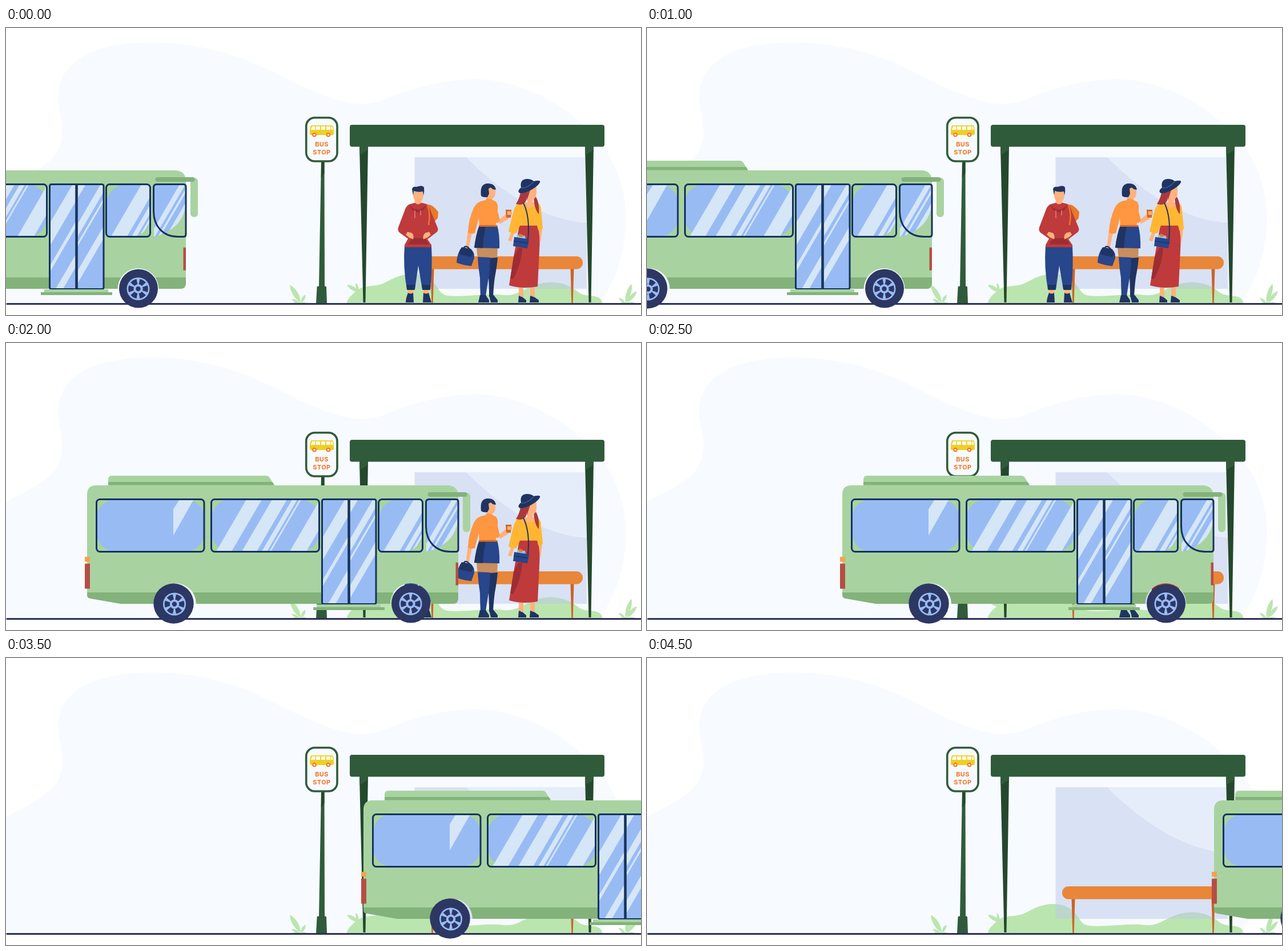
Animation of 1112x504 px, one loop 5 s. Source, as an HTML page:

```html
<!DOCTYPE html>
<html lang="en">
<head>
<meta charset="utf-8">
<title>Bus stop</title>
<style>
  html, body { margin: 0; width: 100%; height: 100%; overflow: hidden; background: #fff; }
  svg { display: block; width: 100%; height: 100%; }
  .word { font: 700 11px Inter, "Open Sans", sans-serif; letter-spacing: .4px; fill: #ee7524; text-anchor: middle; }
  .bus { animation: drive 5s step-end infinite; }
  .man { animation: board1 5s step-end infinite; }
  .women { animation: board2 5s step-end infinite; }
  .frame { fill: none; stroke: #16335f; stroke-width: 3; }
  .glass { fill: #98bbf4; }
  .shine { fill: #d5e6f6; }
  .green { fill: #a8d3a0; }
  .shade { fill: #83b27b; }
  .pine { fill: #305b3a; }
  .moss { fill: #24482d; }
  .leaf { fill: #bbe5ae; }
  .skin { fill: #ffb27d; }
  .navy { fill: #1f3462; }
  .blue { fill: #27468b; }
  .red { fill: #bf3a3b; }
  .wine { fill: #9c2d35; }
  @keyframes drive {
    0% { transform: translateX(-477px); }
    10% { transform: translateX(-404px); }
    20% { transform: translateX(-293px); }
    30% { transform: translateX(-176px); }
    40% { transform: translateX(0); }
    50% { transform: translateX(200px); }
    60% { transform: translateX(306px); }
    70% { transform: translateX(484px); }
    80% { transform: translateX(773px); }
    90%, 100% { transform: translateX(851px); }
  }
  @keyframes board1 { 0% { visibility: visible; } 50%, 100% { visibility: hidden; } }
  @keyframes board2 { 0% { visibility: visible; } 60%, 100% { visibility: hidden; } }
</style>
</head>
<body>
<svg viewBox="0 0 1112 504" preserveAspectRatio="none">
  <defs>
    <path id="leaf" class="leaf" d="M0 0C-7-8-8-25-1-34C6-26 7-10 0 0z"/>
    <path id="spoke" fill="#2c3763" d="M-6-16.2A17 17 0 0 1 6-16.2L3-7.6A8 8 0 0 0-3-7.6z"/>
    <g id="rim">
      <circle r="20" fill="#98bbf4"/>
      <use href="#spoke" transform="rotate(30)"/>
      <use href="#spoke" transform="rotate(90)"/>
      <use href="#spoke" transform="rotate(150)"/>
      <use href="#spoke" transform="rotate(210)"/>
      <use href="#spoke" transform="rotate(270)"/>
      <use href="#spoke" transform="rotate(330)"/>
      <circle r="4.2" fill="#2c3763"/>
    </g>
    <path id="shell" d="M142 266Q142 250 158 250H772Q792 250 792 270V448Q792 458 782 458H744.5A36 36 0 0 0 672.5 458H333A36 36 0 0 0 261 458H201L147 448.500Q142 447.500 142 442z"/>
    <clipPath id="cShell"><use href="#shell"/></clipPath>
    <clipPath id="cDoor"><path d="M554 275h45v183h-45zM603 275h44v183h-44z"/></clipPath>
    <clipPath id="cSide"><path d="M654 307A32 32 0 0 1 686 275H729V334A32 32 0 0 1 697 366H654z"/></clipPath>
    <clipPath id="cNose"><path d="M736 275H792V306C790 338 770 358 736 367z"/></clipPath>
  </defs>

  <path fill="#f7faff" d="M0 279C28 264 58 250 79 231C103 208 101 177 95 149C84 106 97 68 142 46C180 28 238 22 294 27C427 39 487 95 563 121C602 135 633 138 665 125C720 102 775 89 827 90C905 92 990 137 1043 205C1079 252 1088 307 1085 350C1081 407 1065 447 1040 484H0z"/>

  <!-- greenery -->
  <path class="leaf" d="M597 484C597 475 609 465 617 459C628 451 644 455 660 449C678 440 690 432 712 432C736 432 748 444 757 458C762 467 768 470 780 470.500C815 472 843 465 872 469C900 472 912 450 946 447C974 444 991 455 1004 465C1015 474 1044 465 1044 484z"/>
  <use href="#leaf" transform="translate(619 464) rotate(-58) scale(.65 .75)"/>
  <use href="#leaf" transform="translate(617 464) rotate(-12) scale(.4 .5)"/>
  <use href="#leaf" transform="translate(516 482) rotate(-30) scale(.85 1.06)"/>
  <use href="#leaf" transform="translate(517 482) rotate(30) scale(.5 .45)"/>
  <use href="#leaf" transform="translate(514 483) rotate(-62) scale(.4 .45)"/>
  <path class="leaf" d="M499 484Q508 480 516 482Q524 480 528 484z"/>
  <use href="#leaf" transform="translate(1085 482) rotate(19) scale(.75 1)"/>
  <use href="#leaf" transform="translate(1087 482) rotate(43) scale(.65 .78)"/>
  <use href="#leaf" transform="translate(1084 483) rotate(-48) scale(.4 .42)"/>
  <path class="leaf" d="M1073 484Q1080 480 1088 482Q1098 480 1103 484z"/>

  <!-- shelter -->
  <path fill="#bbcae9" opacity=".5" d="M715.500 227H806C848 269 928 337 1017 342V458H715.500z"/>
  <path fill="#d5e2f5" opacity=".5" d="M806 227H1017V342C928 337 848 269 806 227z"/>
  <path fill="#cb6326" d="M743.500 422h6l-1.800 61h-2.400zM988.500 422h6l-1.800 61h-2.400z"/>
  <rect x="727" y="401" width="283" height="22.500" rx="11" fill="#e88639"/>
  <path class="moss" d="M619 208h15l-4.500 274h-4zM1014 208h15l-4.500 274h-4z"/>
  <path class="pine" d="M619 208h15v6l-14.500 9zM1014 208h15v6l-14.500 9z"/>
  <rect class="pine" x="602" y="170" width="446" height="38.500" rx="4"/>

  <!-- sign -->
  <path class="pine" d="M552 234h5.500l.5 221h-10z"/>
  <path class="moss" d="M552 234h5.500v21l-5.700 8z"/>
  <path class="pine" d="M546 453.500h13.500q1.500 0 1.500 2l1 28.500h-19l1.500-28.500q0-2 1.500-2z"/>
  <rect x="525.700" y="157.500" width="54.300" height="76.500" rx="15" fill="#f7faff" stroke="#305b3a" stroke-width="3.600"/>
  <path fill="#efcf23" d="M535 171H571Q573 171 573.300 174L574 181V186Q574 188 572 188H534Q532 188 532 186V180L533 174Q533.500 171 535 171z"/>
  <path fill="#fff" d="M536 172.700h5.500v6h-7.500zM543 172.700h7v6h-7zM552 172.700h7v6h-7zM561 172.700h7v6h-7zM569.500 172.700h2l.8 6h-2.800z"/>
  <g fill="#fff" stroke="#ee7524" stroke-width="2">
    <circle cx="540" cy="187.500" r="2.800"/><circle cx="564.500" cy="187.500" r="2.800"/>
  </g>
  <text class="word" x="553" y="208">BUS</text>
  <text class="word" x="553" y="221.500">STOP</text>

  <path d="M2 484.500H1112" stroke="#2b3155" stroke-width="3.200" stroke-linecap="round"/>

  <g class="man">
    <path fill="#e8782a" d="M738 310Q747 309 757 323L756 334L742 349z"/>
    <path class="skin" d="M704 458h9v12h-9zM731 458h9v12h-9z"/>
    <path class="navy" d="M704 465q4 3 9 0l1 17h-14q0-7 4-17zM731 465q5 3 9 0l5 17h-15z"/>
    <path class="blue" d="M698 382H745Q747 420 743 459H729L722 417L716 459H702Q695 420 698 382z"/>
    <path class="navy" d="M701.500 451h15l-.8 9h-13.500zM728 451h15.500l-.6 9h-13.500z"/>
    <path class="red" d="M708 309Q722 304 736 309Q741 311 744 322L756 351Q758 357 751 361L738 371L745 381V385H698V381L704 370L690 360Q685 356 687 350L698 321Q701 311 708 309z"/>
    <path class="wine" d="M711 369H734L741 380H704zM706 310Q721 328 737 310Q732 322 721 324Q710 322 706 310z"/>
    <path class="skin" d="M703 358l8 2q4 5 2 11l-7-3-6-5zM741 358l-7 2q-5 5-3 11l7-3 6-5zM716 296h11v11q-5 5-11 0z"/>
    <path d="M738 311Q744 326 740 346" fill="none" stroke="#e8782a" stroke-width="2.500"/>
    <path d="M716 320v14M726 320v9" stroke="#e9a9a0" stroke-width="1"/>
    <path class="skin" d="M713 284H731V293Q731 305 722 306Q713 305 713 293z"/>
    <path class="navy" d="M713 294L711 283Q712 278 719 279Q729 275 732 280Q733 287 731 294L730 287Q721 289 714 286z"/>
  </g>

  <g class="women">
    <!-- short hair -->
    <path class="skin" d="M809 355l7 5-5 24-4 3-1-8zM862 338l13-11 1-6 8-2 2 7-6 9-15 9z"/>
    <path fill="#c98d5e" d="M824 386h37l-1 20h-34z"/>
    <path class="navy" d="M846 404l15-1q-1 14-5 35-2 14-3 34h-7q0-19-1-34z"/>
    <path class="blue" d="M826 402l22 1q0 20-3 36-3 17-5 33h-9q-1-18-1-33-3-18-4-37z"/>
    <path class="navy" d="M830 469h10l6 9v4h-19zM846 469h8l7 9v4h-12z"/>
    <path class="blue" d="M829 346h31q5 18 4 41l-44-1q3-24 9-40z"/>
    <path class="navy" d="M829 347h11q-4 20-5 39.500l-15-.5q3-24 9-39z"/>
    <path fill="#ff9640" d="M837 303q12-4 21 2 4 4 3 14l-1 17-3 12H829l-1-14-7 26q-6 3-12-1 1-23 10-43 6-12 18-13z"/>
    <path fill="#ff9640" d="M858 306l3 16 4 16-4 5-6-6z"/>
    <path fill="#d96d27" d="M828 346h32v3h-32z"/>
    <path class="skin" d="M842 278h14l1 11q0 9-6 11l-1 4-8 1z"/>
    <path fill="#ff9640" d="M841 299l11 2-1 7h-12z"/>
    <path class="navy" d="M832 295q-3-22 12-22 12 0 14 11-6 0-9-4l-4 2 1 9-3 6q-7 1-11-2z"/>
    <path fill="#d36a24" d="M875 319h10l-1 14h-8z"/>
    <path fill="#ffb27d" d="M878 322h6v6h-6z"/>
    <path d="M800 391Q803 378 812 388" fill="none" stroke="#1f3462" stroke-width="2.500"/>
    <path class="blue" d="M798 385l16 3q7 6 6 16l-5 14q-14-1-26-6 1-17 9-27z"/>
    <path class="navy" d="M798 385l16 3 5 9-5 5-18-4-3-3z"/>

    <!-- hat -->
    <path class="skin" d="M885 357l5 3-5 15-6-2zM934 352l5 2-3 23-4-9zM898 452h8v22h-8zM918 452h8v22h-8z"/>
    <path class="navy" d="M898 470l7 3 6 5v4h-14zM918 470l8 3 7 5v4h-16z"/>
    <path class="red" d="M899 346h32q5 20 3 45l-3 63q-27 5-50-2l8-50z"/>
    <path class="wine" d="M897 386h7q-1 28-16 55l-5-1 6-38z"/>
    <path fill="#ffb733" d="M899 307h32q6 3 6 14l3 31q-3 5-8 3l-2-8h-30l-6 13q-8 2-14-3l8-33q3-13 11-17z"/>
    <path class="skin" d="M905 306h25q-3 9-12 9t-13-9z"/>
    <path fill="#a9393f" d="M902 281l12-3q-2 15-3 25-5 10-18 6 8-12 9-28zM924 292q11 10 9 35-9-10-9-35z"/>
    <path class="skin" d="M913 279h16v12q-1 9-6 9l-1 9-9-1z"/>
    <path fill="#a9393f" d="M909 279l13-2q-5 8-7 17l-3 9z"/>
    <path class="navy" d="M902 280q-3-14 10-15 8 0 12 4 13-3 11 2-3 6-13 12-14 8-22 7-6-3 2-10z"/>
    <path d="M902 281q11 1 22-11" fill="none" stroke="#3f5da0" stroke-width="1.500"/>
    <path d="M906 307Q918 332 914 371" fill="none" stroke="#1f3462" stroke-width="2"/>
    <path fill="#8fc5e8" d="M896 363l13 2 1 6-15-1z"/>
    <path fill="#e8782a" d="M899 361l6 2-1 4-6-1z"/>
    <path class="blue" d="M890 367l26 4-3 16-25-4z"/>
    <path d="M889 374l26 4" stroke="#1f3462" stroke-width="1.500"/>
  </g>

  <g class="bus">
    <rect class="green" x="800" y="263" width="13" height="69" rx="6"/>
    <path class="green" d="M179 249V240Q179 233 186 233H455Q460 233 462 237L470 250H179z"/>
    <path class="shade" d="M179 244H466.500L470 249.500H179z"/>
    <use href="#shell" class="green"/>
    <rect class="shade" x="140" y="438" width="654" height="21" clip-path="url(#cShell)"/>
    <path fill="#f5a24a" d="M138 375.500h9v8.500h-9z"/>
    <path fill="#b54e44" d="M138 387.500h9v44h-9zM787.500 385.500h4.500v40h-4.500z"/>

    <rect class="glass" x="159" y="275" width="188" height="91" rx="32"/>
    <path class="shine" d="M293 292L303 276H328L293 338z"/>
    <rect class="frame" x="158.500" y="274.500" width="188.500" height="92" rx="6"/>

    <rect class="glass" x="360" y="275" width="188" height="91" rx="32"/>
    <path class="shine" d="M368 366h27l53-91h-27zM413 366h26l53-91h-26zM448 366h9l53-91h-9zM461 366h3l53-91h-3zM497 366h29l22-38V278z"/>
    <rect class="frame" x="359.500" y="274.500" width="189" height="92" rx="6"/>

    <g clip-path="url(#cDoor)">
      <path class="glass" d="M553 274h96v185h-96z"/>
      <path class="shine" d="M553 344L594 274H617L553 384zM553 419L600 338V349L553 430zM564 458L600 396V418L577 458zM602 345L643 274H649V286L602 367zM602 378L649 297V303L602 384z"/>
      <path class="shine" d="M602 427L649 346V368L602 449z"/>
    </g>
    <rect class="frame" x="553.500" y="274.500" width="94.500" height="184" rx="3"/>
    <path d="M600.500 274V458" stroke="#16335f" stroke-width="4.500"/>

    <g clip-path="url(#cSide)">
      <path class="glass" d="M653 274h78v93h-78z"/>
      <path class="shine" d="M661 366h28l53-91h-28zM697 366h9l53-91h-9zM710 366h4l53-91h-4z"/>
    </g>
    <rect class="frame" x="652.500" y="274.500" width="77" height="92" rx="6"/>

    <g clip-path="url(#cNose)">
      <path class="glass" d="M735 274h58v93h-58z"/>
      <path class="shine" d="M728 366h10l53-91h-10zM743 366h4l53-91h-4zM757 366h24l53-91h-24z"/>
    </g>
    <path class="frame" d="M741 274.500H788Q792 274.500 792 279V362Q792 366.500 788 366.500H778C752 366.500 735.500 348 735.500 322V280Q735.500 274.500 741 274.500z"/>
    <rect class="shade" x="738.500" y="262" width="69" height="8" rx="4"/>

    <path class="green" d="M544 459h112v5h-112z"/>
    <path class="shade" d="M538 464h125v5h-125z"/>
    <circle cx="293.500" cy="457.500" r="35.200" fill="#2c3763"/>
    <circle cx="709" cy="457.500" r="34" fill="#2c3763"/>
    <use href="#rim" x="295" y="458.500"/>
    <use href="#rim" x="708.500" y="458"/>
  </g>
</svg>
</body>
</html>
```
